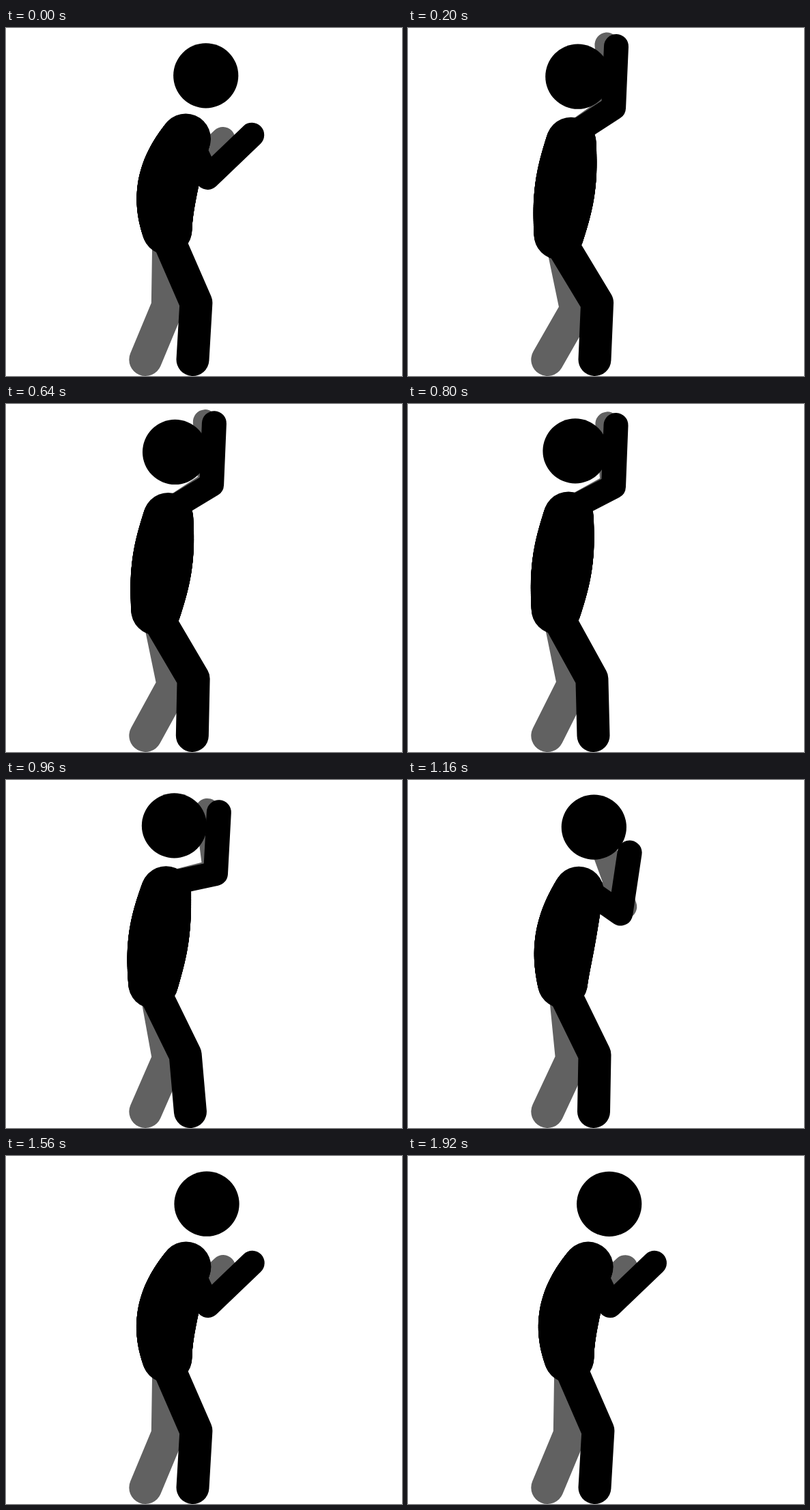
An HTML page with a canvas for the animation above (2 s loop, 580x510 px).

```html
<!DOCTYPE html>
<html lang="en">
<head>
<meta charset="utf-8">
<title>Stick figure</title>
<style>
  html, body { margin: 0; width: 100%; height: 100%; overflow: hidden; background: #fff; }
  canvas { display: block; }
</style>
</head>
<body>
<canvas id="stage" width="580" height="510"></canvas>
<script>
const ctx = document.getElementById('stage').getContext('2d');
const LOOP = 2000, STEP = 40, BEAT = 240, LEAD = 200;
const BLACK = '#000', GREY = '#616161';
const FAR_FOOT = [204.3, 486];

// curl is how far the back is hunched; arms are [upper, fore] in degrees
// clockwise from straight up; foot is the near foot. Everything else follows.
const crouch = { hip: [236, 296], curl: [1], near: [155, 46.2], far: [189, 46.5], foot: [273.5, 486] };
const reach = { hip: [221, 303], curl: [0], near: [57, 2.5], far: [54.5, -5], foot: [273.5, 486] };
const lean = { hip: [213.4, 298.4], curl: [0], near: [68.5, 2], far: [67.5, -4.7], foot: [269.5, 486] };
const lower = { hip: [226.5, 298], curl: [0.62], near: [125, 8.5], far: [116, -20], foot: [272, 486] };
const settle = { ...crouch, curl: [1.07] };

const beats = [crouch, reach, lean, reach, lean, lower, crouch, settle];

const lerp = (a, b, k) => a + (b - a) * k;
const mix = (p, q, k) => p.map((v, i) => lerp(v, q[i], k));

// The first move is one step shorter than the others; the last pose is held.
function poseAt(t) {
  const pos = Math.min(t < LEAD ? t / LEAD : 1 + (t - LEAD) / BEAT, beats.length - 1);
  const i = Math.min(Math.floor(pos), beats.length - 2);
  const pose = {};
  for (const part in crouch) pose[part] = mix(beats[i][part], beats[i + 1][part], pos - i);
  return pose;
}

function along([x, y], deg, len) {
  const r = deg * Math.PI / 180;
  return [x + Math.sin(r) * len, y - Math.cos(r) * len];
}

function disc([x, y], r) {
  ctx.beginPath();
  ctx.arc(x, y, r, 0, 2 * Math.PI);
  ctx.fill();
}

function limb(points, width, color) {
  ctx.lineWidth = width;
  ctx.strokeStyle = color;
  ctx.beginPath();
  points.forEach(p => ctx.lineTo(...p));
  ctx.stroke();
}

function arm(shoulder, [upper, fore], color) {
  const elbow = along(shoulder, upper, 74);
  limb([shoulder, elbow, along(elbow, fore, 90)], 36, color);
}

// The knee is where thigh and shin meet, always bending to the right.
function leg(hip, foot, thigh, shin, color) {
  const dx = foot[0] - hip[0], dy = foot[1] - hip[1];
  const d = Math.hypot(dx, dy);
  const a = (thigh ** 2 - shin ** 2 + d ** 2) / (2 * d);
  const h = Math.sqrt(Math.max(0, thigh ** 2 - a ** 2));
  const knee = [hip[0] + (dx * a + dy * h) / d, hip[1] + (dy * a - dx * h) / d];
  limb([hip, knee, foot], 48, color);
}

// A curved spine swept by a disc that swells toward the middle.
function trunk(hip, chest, bow) {
  const mid = mix(hip, chest, 0.5);
  mid[0] -= bow;
  for (let u = 0; u <= 1; u += 0.01) {
    const p = mix(mix(hip, mid, u), mix(mid, chest, u), u);
    disc(p, 36.5 + 7.7 * Math.sin(Math.PI * u));
  }
}

function draw(t) {
  const { hip, curl: [curl], near, far, foot } = poseAt(t);
  const chest = along(hip, lerp(7.5, 11.7, curl), 138);
  const head = along(chest, lerp(5.9, 17.5, curl), 95.5);
  const shoulder = [chest[0], chest[1] - 9];

  ctx.fillStyle = '#fff';
  ctx.fillRect(0, 0, 580, 510);
  arm(shoulder, far, GREY);
  leg([hip[0] + 2.5, hip[1]], FAR_FOOT, 112, 84.5, GREY);

  ctx.fillStyle = BLACK;
  trunk(hip, chest, 24.5 * curl);
  leg([hip[0] - 4, hip[1]], foot, 116.3, 83.5, BLACK);
  disc(head, 47.6);
  arm(shoulder, near, BLACK);
}

ctx.lineCap = ctx.lineJoin = 'round';
const start = performance.now();

function tick() {
  const t = (performance.now() - start) % LOOP;
  draw(Math.floor(t / STEP) * STEP);
  requestAnimationFrame(tick);
}
tick();
</script>
</body>
</html>
```
